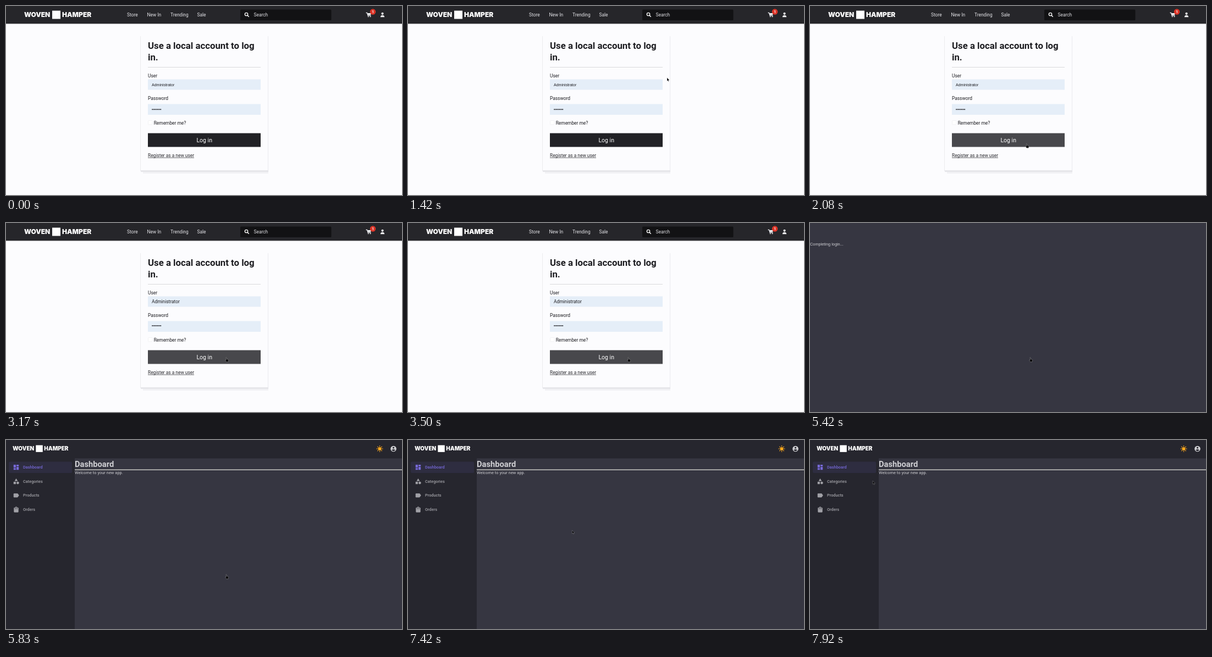
Write an HTML page that moves like this. It is 720 px wide and 344 px high and loops after 8000 ms.

```html
<!DOCTYPE html>
<html lang="en">
<head>
<meta charset="utf-8">
<title>Shop login</title>
<style>
  html, body { margin: 0; width: 100%; height: 100%; overflow: hidden; background: #fcfcfe; }
  svg { display: block; width: 100vw; height: 100vh; }
  text { font-family: Roboto, sans-serif; font-size: 8.4px; white-space: pre; }
  .arial { font-family: "Liberation Sans", Arial, sans-serif; }
  .brand { font-family: Inter, sans-serif; font-size: 12px; font-weight: 900; fill: #fff; }
  .mud { font-size: 7.35px; letter-spacing: .01em; }
  .menu { font-size: 7.35px; font-weight: 500; }
</style>
</head>
<body>
<svg id="stage" viewBox="0 0 720 344" xmlns="http://www.w3.org/2000/svg"></svg>
<script>
const LOOP = 8000, FPS = 12;
const INK = '#1c1c20', HEADER = '#26262a', PALE = '#fcfcfe', FIELD = '#e5eef8';
const BAR = '#26262e', DARK = '#363641', MUTED = '#a0a0a6', LIGHT = '#d0d0d4', VIOLET = '#7769d8';
const RING = { x: 364.5, y: 101.5, r: 26.7 };
const AROUND = 2 * Math.PI * RING.r;

const rect = (x, y, w, h, fill, more = '') =>
  `<rect x="${x}" y="${y}" width="${w}" height="${h}" fill="${fill}" ${more}/>`;
const text = (x, y, str, fill, more = '') =>
  `<text x="${x}" y="${y}" fill="${fill}" ${more}>${str}</text>`;
const circle = (x, y, r, fill, more = '') =>
  `<circle cx="${x}" cy="${y}" r="${r}" fill="${fill}" ${more}/>`;
const group = (id, body, more = '') => `<g id="${id}" ${more}>${body}</g>`;
const icon = (cx, cy, fill, body) =>
  `<g transform="translate(${cx - 6.3} ${cy - 6.3}) scale(.525)" fill="${fill}" fill-rule="evenodd">${body}</g>`;

const brand = more => `<g ${more}>
  ${text(33, 20, 'WOVEN', '#fff', 'class="brand"')}
  ${rect(84, 8.5, 15, 15, '#fff')}
  ${text(102, 20, 'HAMPER', '#fff', 'class="brand"')}</g>`;

const cart = `<g fill="none" stroke="#f4f4f6" stroke-width="1.2">
  <path d="M654.5 12.3h2l1.5 5.2h5.5"/><path d="M657 13h7l-1 3.4h-5z" fill="#f4f4f6" stroke="none"/></g>
  ${circle(658.7, 19.3, 1, '#f4f4f6')}${circle(662.5, 19.3, 1, '#f4f4f6')}`;

const topBar = rect(0, 0, 720, 32.5, HEADER) + rect(0, 32.5, 720, 1, '#e9e9ec') + brand('') +
  [['Store', 220], ['New In', 256.5], ['Trending', 299], ['Sale', 347.5]]
    .map(([s, x]) => text(x, 19, s, '#e4e4e8')).join('') +
  rect(426, 6.5, 165.5, 19.5, '#121214', 'rx="1.5"') +
  circle(437, 15, 2.7, 'none', 'stroke="#fff" stroke-width="1.3"') +
  '<path d="M439 17l2.7 2.7" stroke="#fff" stroke-width="1.5"/>' +
  text(450.5, 19, 'Search', '#dedee2') + cart +
  circle(667, 10.5, 5.2, '#dc3528') +
  text(667, 12.8, '1', '#fff', 'text-anchor="middle" style="font-size:6.5px;font-weight:700"') +
  circle(684.5, 13.8, 2.1, '#f4f4f6') +
  '<path d="M680.8 20.2q0-3.5 3.7-3.5t3.7 3.5z" fill="#f4f4f6"/>';

const dots = Array.from({ length: 7 }, (_, i) => circle(266.2 + i * 2.5, 0, 1, INK)).join('');

const card = rect(244, 55, 1, 245, '#ebebee') + rect(476, 55, 1, 245, '#ebebee') +
  rect(245, 299, 232, 3, '#e6e6ea') + rect(249, 302, 228, 3, '#f2f2f5') +
  text(258, 78.3, 'Use a local account to log', INK, 'style="font-size:16.8px;font-weight:700"') +
  text(258, 98.6, 'in.', INK, 'style="font-size:16.8px;font-weight:700"') +
  rect(258, 111, 205, 1, '#d9d9dc') +
  text(258, 130, 'User', INK) + rect(258, 133.5, 205, 19, FIELD) +
  text(265, 145.6, 'Administrator', INK, 'id="preview" class="arial" style="font-size:7px"') +
  text(265, 146, 'Administrator', INK, 'id="filled"') +
  text(258, 170.5, 'Password', INK) + rect(258, 178.5, 205, 19.5, FIELD) +
  group('dots', dots) +
  rect(258.5, 208.5, 7.5, 7.5, '#fff', 'rx="1" stroke="#eeeef2" stroke-width=".8"') +
  text(268.7, 215.7, 'Remember me?', INK) +
  rect(258, 231.5, 205, 25, HEADER, 'id="button"') +
  text(360.7, 248, 'Log in', '#fff', 'text-anchor="middle" style="font-size:10.5px"') +
  text(258, 274.6, 'Register as a new user', '#2a2a2e') +
  rect(258, 275.8, 84, .7, '#2a2a2e');

const loader =
  circle(RING.x, RING.y, RING.r, 'none', 'stroke="#e0e0e0" stroke-width="5"') +
  circle(RING.x, RING.y, RING.r, 'none', `id="arc" stroke="#1f6fb8" stroke-width="5"
    transform="rotate(-90 ${RING.x} ${RING.y})"`) +
  text(365.5, 103.3, '', INK, 'id="percent" class="arial" text-anchor="middle" style="font-weight:700"');

const glyphs = {
  Dashboard: '<path d="M3 13h8V3H3zM3 21h8v-6H3zM13 21h8V11h-8zM13 3v6h8V3z"/>',
  Categories: '<path d="M12 2L6.5 11h11zM3 13.5h8v8H3z"/><circle cx="17.5" cy="17.5" r="4.5"/>',
  Products: '<path d="M17.6 5.8Q17 5 16 5H5Q3 5 3 7v10q0 2 2 2h11q1 0 1.6-.8L22 12z"/>',
  Orders: '<path d="M20 6h-4a4 4 0 0 0-8 0H4v14q0 2 2 2h12q2 0 2-2zM12 4a2 2 0 0 1 2 2h-4a2 2 0 0 1 2-2zM8 8h2v3H8zM14 8h2v3h-2z"/>'
};

const menu = Object.keys(glyphs).map((name, i) => {
  const y = 49.6 + i * 25.6, fill = i ? MUTED : VIOLET;
  return icon(18.5, y, fill, glyphs[name]) + text(31, y + 2.5, name, fill, 'class="menu"');
}).join('');

const rays = Array.from({ length: 8 }, (_, i) =>
  `<path d="M679.5 10.2v1.8" transform="rotate(${i * 45} 679.5 16)"/>`).join('');

const dashboard = rect(0, 0, 720, 344, DARK) + rect(0, 0, 720, 33.5, BAR) + rect(0, 0, 125, 344, BAR) +
  brand('transform="translate(-15.4 2.4) scale(.83)"') +
  circle(679.5, 16, 3.1, '#ffa81c') + `<g stroke="#ffa81c" stroke-width="1.3">${rays}</g>` +
  circle(704.5, 16, 5.3, LIGHT) + circle(704.5, 14.1, 1.7, BAR) +
  `<path d="M701.2 18.4q3.3-2.6 6.6 0q-3.3 3.6-6.6 0z" fill="${BAR}"/>` +
  rect(5, 39.5, 115, 20.5, '#2e2d40', 'rx="2"') + menu +
  text(125, 48.6, 'Dashboard', LIGHT, 'style="font-size:14.7px;font-weight:700"') +
  rect(125, 53.6, 595, 1.3, '#deded8') +
  text(125, 61.5, 'Welcome to your new app.', LIGHT, 'class="mud"');

const pointer = group('arrow', '<path d="M.4.4v6l1.4-1.2 1 2 .9-.4-.9-1.9 1.9-.1z"/>') +
  group('hand', '<path d="M1.9.5q.9-.3 1 .7v2l2.3.6q1 .3.8 1.4l-.5 2.6H2.4L.5 5.3q0-.9 1-.5l.4.4z" transform="scale(1.1)"/>');

document.getElementById('stage').innerHTML =
  rect(0, 0, 720, 344, PALE) +
  group('login', topBar + card) + group('loading', loader) +
  group('callback', rect(0, 0, 720, 344, DARK) +
    text(0, 40.5, 'Completing login...', LIGHT, 'class="arial" style="font-size:7.35px"')) +
  group('dashboard', dashboard) +
  group('cursor', pointer, 'fill="#040406" stroke="#fff" stroke-opacity=".6" stroke-width=".4"');

const $ = id => document.getElementById(id);
const show = (id, on) => $(id).setAttribute('display', on ? 'inline' : 'none');

// Pointer track: [tick, x, y], in twelfths of a second
const track = [
  [11, 507, 89], [15, 507, 89], [20, 416, 192], [21, 416, 192], [25, 391.3, 250], [27, 392, 252],
  [28, 392, 252], [32, 398, 244.2], [88, 398, 244.2], [90, 198, 84], [91, 198, 84],
  [92, 197.4, 84], [94, 197.4, 84], [95, 113.7, 74]
];

function pointerAt(tick) {
  const i = track.findIndex(k => k[0] >= tick);
  if (i < 0) return track[track.length - 1].slice(1);
  if (i === 0) return track[0].slice(1);
  const [t0, x0, y0] = track[i - 1], [t1, x1, y1] = track[i];
  const p = (tick - t0) / (t1 - t0);
  return [x0 + (x1 - x0) * p, y0 + (y1 - y0) * p];
}

function draw(ms) {
  const tick = Math.floor((ms + 5) * FPS / 1000);
  const [x, y] = pointerAt(tick);
  const over = tick <= 88 && y >= 232;
  const clicked = tick >= 38;

  show('login', tick < 43);
  show('loading', tick >= 44 && tick < 65);
  show('callback', tick === 65);
  show('dashboard', tick >= 66);

  show('preview', !clicked);
  show('filled', clicked);
  $('dots').setAttribute('transform', `translate(0 ${clicked ? 187 : 188.2})`);
  $('button').setAttribute('fill', over ? '#48484c' : '#222226');

  const part = Math.min(1, Math.max(0, (tick - 44) * .2));
  $('arc').setAttribute('stroke-dasharray', `${part * AROUND} ${tick >= 48 ? 0 : AROUND}`);
  $('percent').textContent = tick >= 47 ? '100%' : Math.round(part * 150) + '%';

  show('cursor', tick >= 11);
  show('hand', over);
  show('arrow', !over);
  $('cursor').setAttribute('transform', `translate(${x} ${y})`);
}

const start = performance.now();
function loop() {
  draw((performance.now() - start) % LOOP);
  requestAnimationFrame(loop);
}
loop();
</script>
</body>
</html>
```
